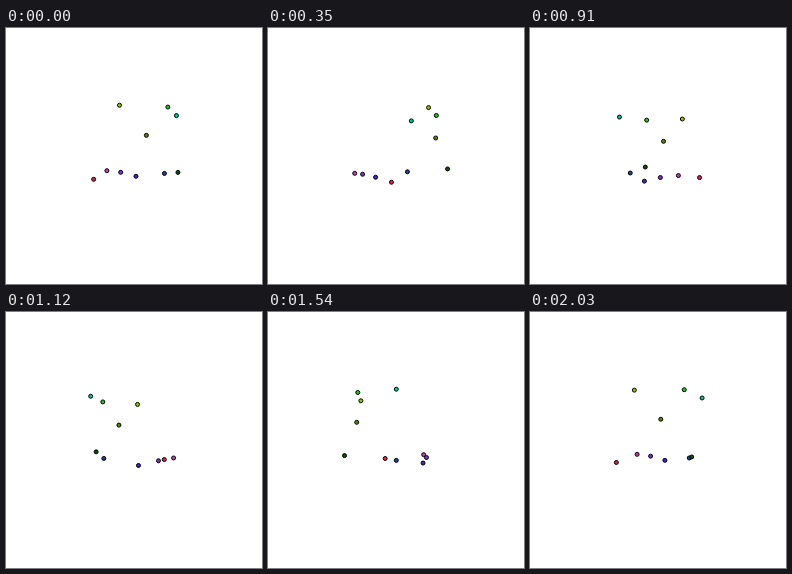
These frames come from a looping animation (256x256 px, 2100 ms). An HTML page with a canvas:

```html
<!DOCTYPE html>
<html lang="en">
<head>
<meta charset="utf-8">
<title>Rotating points</title>
<style>
  html, body { margin: 0; width: 100%; height: 100%; overflow: hidden; background: #fff; }
  canvas { display: block; width: 100%; height: 100%; }
</style>
</head>
<body>
<canvas id="stage" width="256" height="256"></canvas>
<script>
const ctx = document.getElementById('stage').getContext('2d');
const STEP = 70, STEPS = 30;
const CENTER = 128.3, DEPTH = 230;

// orbit radius, start angle in degrees, height, colour
const points = [
  [41.3, 204.5, 21.3, '#dc2846'],
  [39, -75, -17.5, '#508c00'],
  [41.3, -107.3, -42.3, '#8cc800'],
  [42.7, -47.3, -42.5, '#1ec81e'],
  [54.6, -49, 13.2, '#0a500a'],
  [43.2, 6, -41.5, '#00c896'],
  [30.7, 6, 17.4, '#1e4696'],
  [26.6, 86, 22.3, '#4628b4'],
  [34, 117, 18.1, '#8232c8'],
  [41.3, 138, 16.1, '#c83cb4']
];

function project([radius, start, height, color], turn) {
  const angle = (start + turn) * Math.PI / 180;
  const z = radius * Math.sin(angle);
  const scale = DEPTH / (DEPTH + z);
  return {
    x: CENTER + radius * Math.cos(angle) * scale,
    y: CENTER + height * scale,
    z, color
  };
}

function drawDot({ x, y, color }) {
  ctx.beginPath();
  ctx.arc(x, y, 2, 0, Math.PI * 2);
  ctx.fillStyle = color;
  ctx.fill();
  ctx.stroke();
}

function draw(now) {
  const step = Math.floor(now / STEP) % STEPS;
  ctx.fillStyle = '#fff';
  ctx.fillRect(0, 0, 256, 256);
  ctx.strokeStyle = '#000';
  ctx.lineWidth = 1;
  points.map(p => project(p, step * 360 / STEPS))
    .sort((a, b) => b.z - a.z)
    .forEach(drawDot);
}

const begin = performance.now();
function tick() {
  draw(performance.now() - begin);
  requestAnimationFrame(tick);
}
tick();
</script>
</body>
</html>
```
